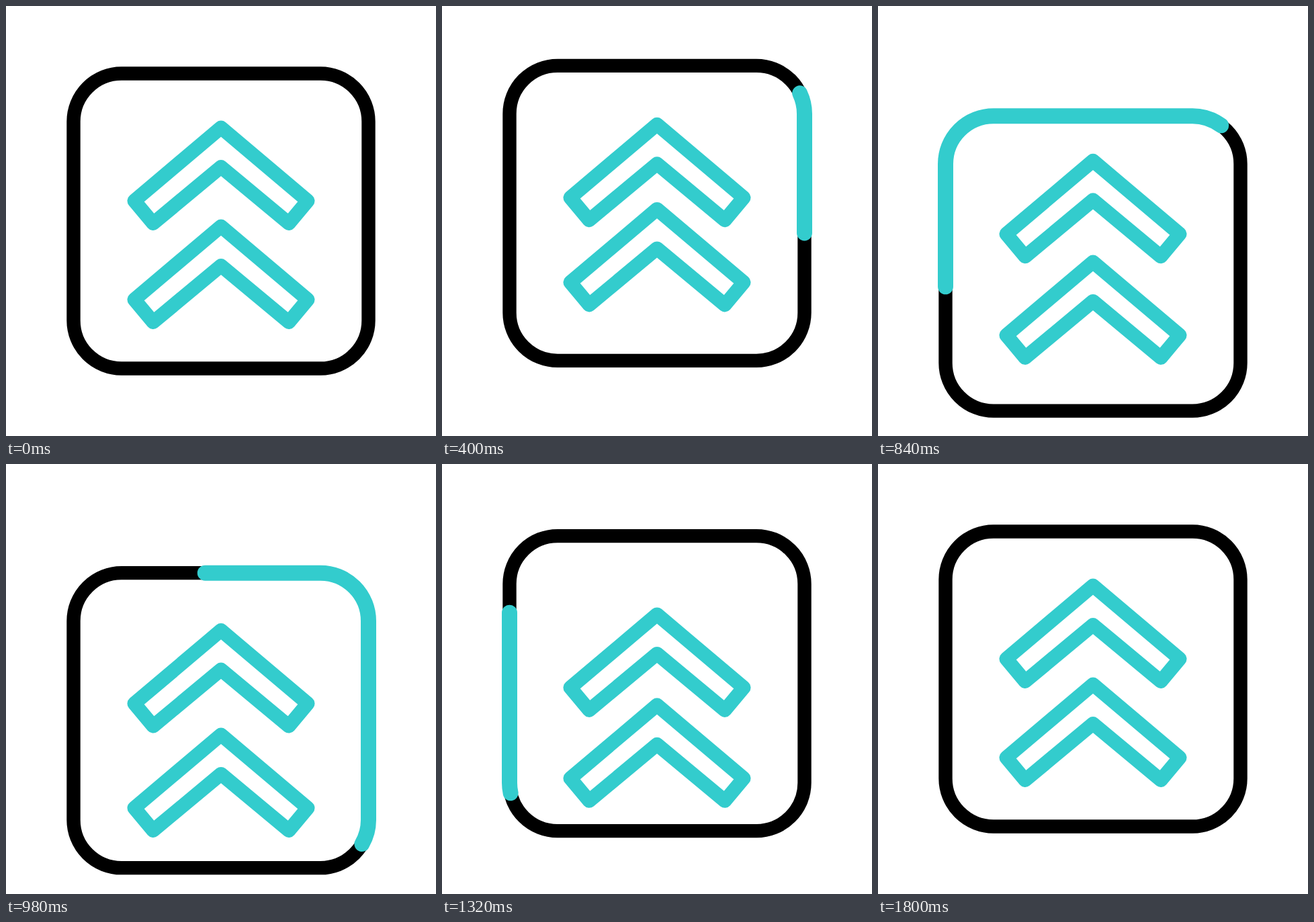
These frames come from a looping animation (640 px wide and 640 px high, 2720 ms). An HTML page:

```html
<!DOCTYPE html>
<html lang="en">
<head>
<meta charset="utf-8">
<title>Swipe up icon</title>
<style>
  html, body { margin: 0; width: 100%; height: 100%; overflow: hidden; background: #fff; }
  svg { display: block; width: 100%; height: 100%; }
</style>
</head>
<body>
<svg viewBox="0 0 640 640" fill="none" stroke-linecap="round" stroke-linejoin="round">
  <defs>
    <path id="outline" pathLength="1" d="M320 100.5H468a71.5 71.5 0 0 1 71.5 71.5V468a71.5 71.5 0 0 1 -71.5 71.5H172a71.5 71.5 0 0 1 -71.5 -71.5V172a71.5 71.5 0 0 1 71.5 -71.5Z"/>
    <path id="chevron" d="M320 181L449 290L421 323.5L320 239.5L219 323.5L191 290Z"/>
  </defs>
  <g id="box">
    <use href="#outline" stroke="#000" stroke-width="20.4"/>
    <use id="runner" href="#outline" stroke="#33cccd" stroke-width="23"/>
  </g>
  <g stroke="#33cccd" stroke-width="21">
    <use id="upper" href="#chevron"/>
    <use id="lower" href="#chevron" y="147"/>
  </g>
</svg>
<script>
const LOOP = 2720, STEP = 20, REST = 1800;
const RUN_START = 240, RUN_END = 1525;
const $ = id => document.getElementById(id);

function bezier(x1, y1, x2, y2) {
  const at = (u, a, b) => 3 * u * (1 - u) * ((1 - u) * a + u * b) + u ** 3;
  return x => {
    let lo = 0, hi = 1;
    for (let i = 0; i < 24; i++) {
      const mid = (lo + hi) / 2;
      if (at(mid, x1, x2) < x) lo = mid; else hi = mid;
    }
    return at((lo + hi) / 2, y1, y2);
  };
}

const linear = x => x;
const smooth = bezier(.33, 0, .67, 1);
const late = bezier(.67, 0, .67, 1);
const early = bezier(.33, 0, .33, 1);
const runEase = bezier(.36, .36, .52, 1);

// Each key: time, vertical offset, easing used to reach it.
const tracks = {
  box: [[0, 0], [240, -39, late], [880, 63.5, bezier(.29, 0, .36, 1)],
        [1530, -39, bezier(.7, 0, .7, 1)], [REST, 0, early]],
  upper: [[0, 0], [260, -22, smooth], [1150, 87.5, linear],
          [1520, -14, smooth], [REST, 0, smooth]],
  lower: [[0, 0], [240, -34, smooth], [1140, 85, bezier(.38, 0, .66, 1)],
          [1520, -32.5, smooth], [REST, 0, smooth]]
};

function valueAt(keys, t) {
  const i = keys.findIndex(key => key[0] > t);
  if (i < 0) return keys[keys.length - 1][1];
  const [t0, v0] = keys[i - 1], [t1, v1, ease] = keys[i];
  return v0 + (v1 - v0) * ease((t - t0) / (t1 - t0));
}

function drawRunner(t) {
  const x = (t - RUN_START) / (RUN_END - RUN_START);
  const visible = x > 0 && x < 1;
  $('runner').setAttribute('visibility', visible ? 'visible' : 'hidden');
  if (!visible) return;
  const head = x + runEase(x), tail = x + 1 - runEase(1 - x);
  const length = head - tail;
  $('runner').setAttribute('stroke-dasharray', `${length} ${1 - length}`);
  $('runner').setAttribute('stroke-dashoffset', 1 - tail % 1);
}

function draw(t) {
  for (const id in tracks)
    $(id).setAttribute('transform', `translate(0 ${valueAt(tracks[id], t).toFixed(2)})`);
  drawRunner(t);
}

const start = performance.now();
function tick() {
  const t = (performance.now() - start) % LOOP;
  draw(Math.floor(t / STEP) * STEP);
  requestAnimationFrame(tick);
}
tick();
</script>
</body>
</html>
```
